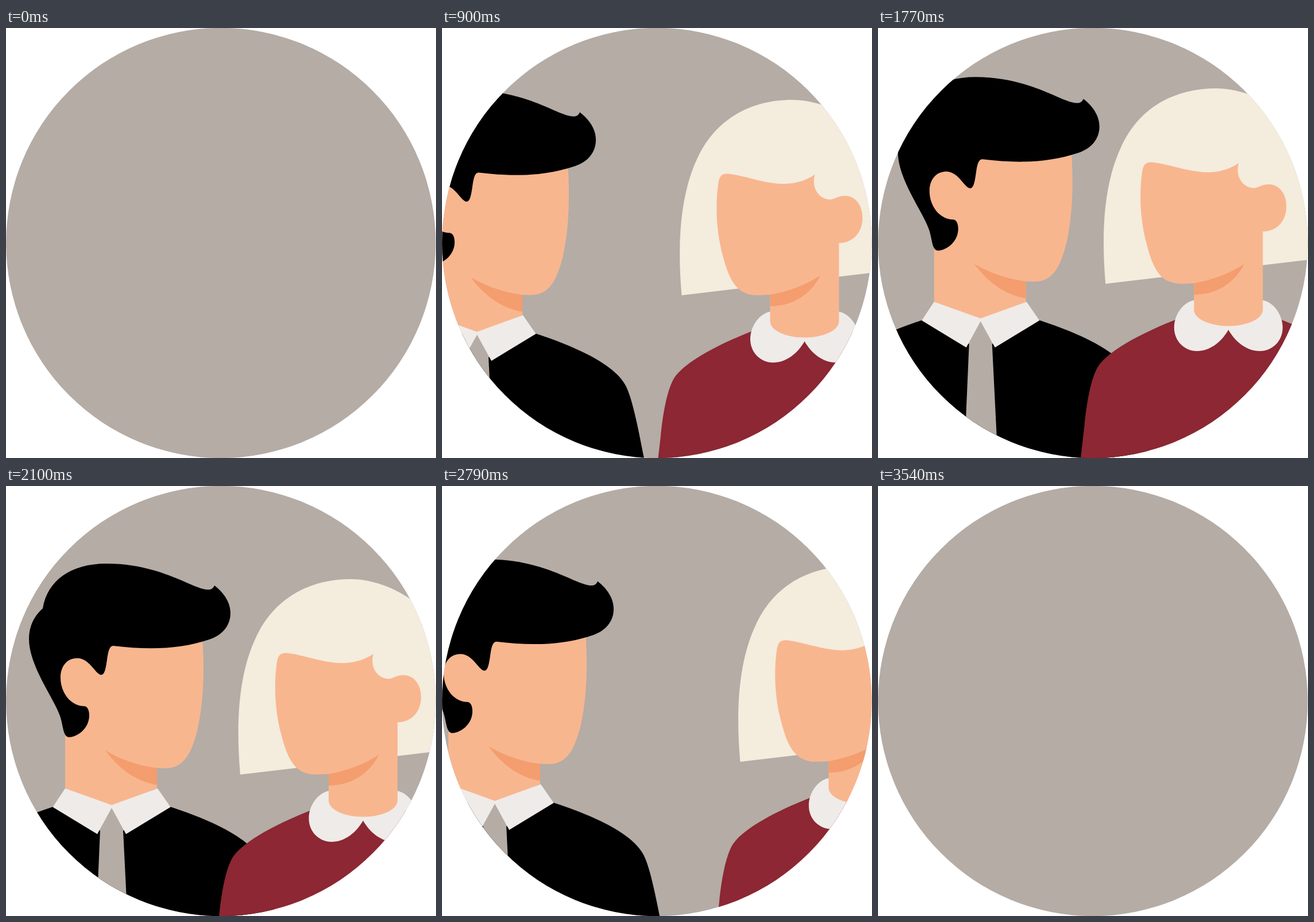
These frames come from a looping animation (749 px wide and 748 px high, 3600 ms). An HTML page:

```html
<!DOCTYPE html>
<html lang="en">
<head>
<meta charset="utf-8">
<title>Two people meeting</title>
<style>
  html, body { margin: 0; width: 100%; height: 100%; overflow: hidden; background: #fff; }
  svg { display: block; width: 749px; height: 748px; }
  .back { fill: #b4aca5; }
  .skin { fill: #f8b68f; }
  .shade { fill: #f49d6e; }
  .blonde { fill: #f4ecdd; }
  .collar { fill: #efebe8; }
  .dress { fill: #8c2733; }
</style>
</head>
<body>
<svg viewBox="0 0 749 748">
  <clipPath id="disc"><circle cx="374.3" cy="374" r="374.2"/></clipPath>
  <circle class="back" cx="374.3" cy="374" r="374.2"/>
  <g clip-path="url(#disc)">
    <g id="man" transform="translate(-500 0)">
      <path d="M286 558C345 577 420 608 442 647C455 669 467 735 475 775L490 900H-122L-108 775C-100 735 -88 670 -74 647C-51 609 23 577 82 558Z"/>
      <path class="back" d="M184 556L207 599H204L219 900H151L164 599H161Z"/>
      <path class="skin" d="M103 526V420L85 340L100 280L200 240L342 262C347 335 342 385 334 422C322 470 308 492 275 491L263 490.500V526L184 557Z"/>
      <path class="shade" d="M173 460C202 477 233 487 263 490.500V520C225 514 195 490 173 460Z"/>
      <path class="collar" d="M103 526L184 555L264 526L286.500 558.500L209 605.500L184 560L159 605.500L81.500 558.500Z"/>
      <path d="M64 213C72 165 112 135 175 135C235 135 280 153 310 166C335 177 358 188 363 173C380 186 391 203 391 221C391 242 378 259 354 267C300 285 245 285 187 278C180 278 178 288 176 302C174 316 172 328.500 166 328.500C156 328.500 146 299.500 124 299.500C106 299.500 95 314 95 333C95 360 113 383 137 383C143 384 145 392 145 399C145 420 127 436 110 437C99 437 100 417 94 400C84 370 40 313 40 266C40 243 50 225 64 213Z"/>
    </g>
    <g id="woman" transform="translate(500 0)">
      <path class="blonde" d="M408 502C399 400 408 320 436 262C470 190 535 162 600 162C660 162 740 200 780 290C796 340 804 400 806 455Z"/>
      <path class="dress" d="M530 564.500C470 588 414 618 395.500 645C383 664 375 708 371.300 748L356 880H888L873 748C869 708 861 664 848.500 645C830 618 774 588 714 564.500Z"/>
      <path class="collar" d="M562 530.500C543 534 527.500 556 527.500 578C527.500 602 546 619 567 619C590 619 610 603 622 582C634 603 654 619 677 619C698 619 716.500 602 716.500 578C716.500 556 701 534 682 530.500Z"/>
      <path class="skin" d="M472 306C474 293 480 289 492 291C520 294 555 309 590 308C612 307 628 300 640 292C633 316 648 335.500 667 335.500C674 335 680 329 692 329C712 329 723 347 723 367C723 392 707 411 682 411V547C682 563 655 575.500 622 575.500C589 575.500 562 563 562 547V501L541 502C506 502 491.500 480 479.500 432.500C469.500 396 465.500 350 472 306Z"/>
      <path class="shade" d="M650 467C625 484 592 496 562 501V521C600 521 632 502 650 467Z"/>
    </g>
  </g>
</svg>
<script>
  const LOOP = 3600, STEP = 30;

  // Both walk in, bob as they meet, and walk out: shared key times, smooth in between.
  const times = [0, 540, 900, 1410, 1755, 2100, 2550, 3060, 3600];
  const actors = {
    man: {
      x: [-430, -250, -123, -33, -6, 0, -30, -183, -392],
      y: [-40, -30, -26.5, -3, -50, 0, -17.5, 4, -20]
    },
    woman: {
      x: [360, 95, 9.5, -16, -12, 0, 34, 213, 370],
      y: [-20, -60, -37, -30, -58, 0, -45, 7, -20]
    }
  };

  function slope(v, i) {
    const a = Math.max(i - 1, 0), b = Math.min(i + 1, times.length - 1);
    return (v[b] - v[a]) / (times[b] - times[a]);
  }

  // Cubic Hermite curve through the key values.
  function along(v, t) {
    const j = times.findIndex(key => key > t), i = j - 1;
    const d = times[j] - times[i], u = (t - times[i]) / d, w = 1 - u;
    return v[i] * w * w * (1 + 2 * u) + v[j] * u * u * (1 + 2 * w)
      + d * u * w * (slope(v, i) * w - slope(v, j) * u);
  }

  const start = performance.now();
  function draw() {
    const now = (performance.now() - start) % LOOP;
    const t = Math.min(Math.floor(now / STEP) * STEP, LOOP - 2 * STEP);
    for (const [id, { x, y }] of Object.entries(actors)) {
      document.getElementById(id).setAttribute('transform', `translate(${along(x, t)} ${along(y, t)})`);
    }
    requestAnimationFrame(draw);
  }
  draw();
</script>
</body>
</html>
```
